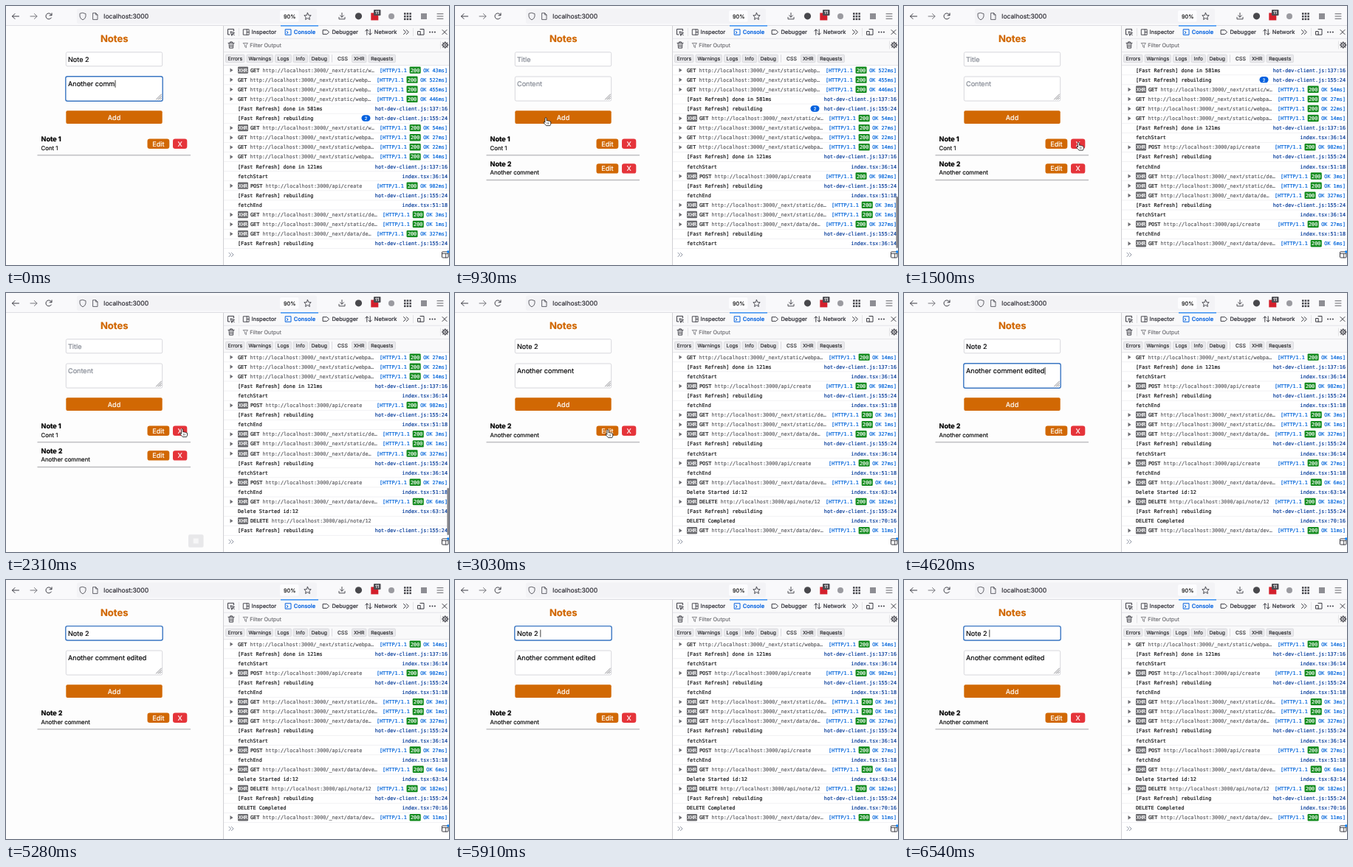
These frames come from a looping animation (600x352 px, 6.57 s). An HTML page with a canvas:

```html
<!DOCTYPE html>
<html lang="en">
<head>
<meta charset="utf-8">
<title>Notes</title>
<style>
html, body { margin: 0; width: 600px; height: 352px; overflow: hidden; background: #fdfdfd; }
canvas { display: block; width: 600px; height: 352px; }
</style>
</head>
<body>
<canvas id="stage" width="600" height="352"></canvas>
<script>
const ctx = document.getElementById('stage').getContext('2d');
const LOOP = 6570, TICK = 30;
const SANS = 'Inter, Roboto, sans-serif';
const MONO = '6.8px "DejaVu Sans Mono", monospace';
const ORANGE = '#d16803', RED = '#e5343a', BLUE = '#0060df', INK = '#3a3a42';

// ---------- drawing helpers ----------
function rect(x, y, w, h, fill) { ctx.fillStyle = fill; ctx.fillRect(x, y, w, h); }

function box(x, y, w, h, r, fill, stroke, lw = 1) {
  ctx.beginPath();
  ctx.roundRect(x, y, w, h, r);
  if (fill) { ctx.fillStyle = fill; ctx.fill(); }
  if (stroke) { ctx.strokeStyle = stroke; ctx.lineWidth = lw; ctx.stroke(); }
}

function dot(x, y, r, fill) {
  ctx.beginPath();
  ctx.arc(x, y, r, 0, 7);
  ctx.fillStyle = fill;
  ctx.fill();
}

function path(d, x, y, stroke, lw = 1, fill) {
  ctx.save();
  ctx.translate(x, y);
  const p = new Path2D(d);
  if (fill) { ctx.fillStyle = fill; ctx.fill(p); }
  if (stroke) { ctx.strokeStyle = stroke; ctx.lineWidth = lw; ctx.lineCap = ctx.lineJoin = 'round'; ctx.stroke(p); }
  ctx.restore();
}

// A hairline stroke gives small type the heavier desktop rendering.
function text(s, x, y, font, fill, align = 'left') {
  ctx.font = font;
  ctx.fillStyle = ctx.strokeStyle = fill;
  ctx.lineWidth = 0.2;
  ctx.textAlign = align;
  ctx.fillText(s, x, y);
  ctx.strokeText(s, x, y);
}

const sans = (size, weight = 400) => `${weight} ${size}px ${SANS}`;
const clamp = v => Math.max(0, Math.min(1, v));

// ---------- console log ----------
const HOST = 'http://localhost:3000/';
const net = (xhr, verb, url, ms, at = 0, done = 0) => ({ xhr, verb, url, ms, at, done });
const msg = (line, src, at = 0, count = 0) => ({ line, src, at, count });
const REBUILD = '[Fast Refresh] rebuilding', HOT = 'hot-dev-client.js:';
const LOG = [
  net(1, 'GET', '_next/static/w…', 43),
  net(0, 'GET', '_next/static/webp…', 522),
  net(0, 'GET', '_next/static/webp…', 455),
  net(0, 'GET', '_next/static/webp…', 446),
  msg('[Fast Refresh] done in 581ms', HOT + '137:16'),
  msg(REBUILD, HOT + '155:24', 0, 2),
  net(1, 'GET', '_next/static/w…', 54),
  net(0, 'GET', '_next/static/webpa…', 27),
  net(0, 'GET', '_next/static/webpa…', 22),
  net(0, 'GET', '_next/static/webpa…', 14),
  msg('[Fast Refresh] done in 121ms', HOT + '137:16'),
  msg('fetchStart', 'index.tsx:36:14'),
  net(1, 'POST', 'api/create', 982),
  msg(REBUILD, HOT + '155:24'),
  msg('fetchEnd', 'index.tsx:51:18'),
  net(1, 'GET', '_next/static/de…', 3),
  net(1, 'GET', '_next/static/de…', 1),
  net(1, 'GET', '_next/data/de…', 327),
  msg(REBUILD, HOT + '155:24'),
  msg('fetchStart', 'index.tsx:36:14', 780),
  net(1, 'POST', 'api/create', 27, 960, 1050),
  msg('fetchEnd', 'index.tsx:51:18', 1050),
  net(1, 'GET', '_next/data/deve…', 6, 1110, 1170),
  msg('Delete Started id:12', 'index.tsx:63:14', 2100),
  net(1, 'DELETE', 'api/note/12', 182, 2130, 2400),
  msg(REBUILD, HOT + '155:24', 2220),
  msg('DELETE Completed', 'index.tsx:70:16', 2400),
  net(1, 'GET', '_next/data/dev…', 11, 2460, 2550)
];

function tag(label, x, y, w, fill) {
  box(x, y - 7.3, w, 9.4, 1.2, fill);
  text(label, x + w / 2, y, MONO, '#fff', 'center');
}

function netRow(e, y, t) {
  path('M0-2.8L4 0L0 2.8Z', 303.5, y - 2.4, null, 0, '#6c6c71');
  let x = 314;
  if (e.xhr) { tag('XHR', x, y, 14, '#6a6a6e'); x += 17; }
  text(e.verb, x, y, MONO, '#18181a');
  text(HOST + e.url, x + (e.verb.length + 1) * 4.094, y, MONO, '#626267');
  if (t < e.done) return;
  const tail = `OK ${e.ms}ms]`, left = 598 - tail.length * 4.094;
  text(tail, left, y, MONO, '#0064da');
  tag('200', left - 18.6, y, 15, '#118a1c');
  text('[HTTP/1.1', left - 22.4, y, MONO, '#0064da', 'right');
}

function consoleLog(t) {
  const rows = LOG.filter(e => t >= e.at);
  ctx.save();
  ctx.beginPath();
  ctx.rect(295, 81, 305, 249.5);
  ctx.clip();
  rows.slice(-20).reverse().forEach((e, i) => {
    const y = 325.3 - i * 13.09;
    rect(295, y + 3.8, 305, 0.6, '#e8e8ec');
    if (e.verb) return netRow(e, y, t);
    text(e.line, 314, y, MONO, '#18181a');
    text(e.src, 598, y, MONO, '#0a3f9c', 'right');
    if (e.count) {
      box(481.5, y - 6.8, 12, 8.4, 4.2, BLUE);
      text(e.count, 487.5, y - 0.2, sans(6), '#fff', 'center');
    }
  });
  ctx.restore();
  scrollbar(t, 780, 1380, 259);
  scrollbar(t, 2100, 2760, 265);
}

function scrollbar(t, from, to, y) {
  if (t < from || t > to) return;
  ctx.globalAlpha = clamp((to - t) / 150);
  box(597.4, y, 2.6, 329 - y, 1.3, '#85858a');
  ctx.globalAlpha = 1;
}

// ---------- browser chrome ----------
function toolbar() {
  rect(0, 0, 600, 27, '#f9f9fb');
  rect(0, 26, 600, 0.8, '#d8d8de');
  path('M9 0H0M3.5-3.5L0 0L3.5 3.5', 8.5, 14, INK, 1);
  path('M0 0H9M5.5-3.5L9 0L5.5 3.5', 33, 14, '#77777d', 1);
  path('M4-1.4A4 4 0 1 0 3.6 2M4.2-4.2V-1.2H1.2', 57.8, 14, INK, 1);
  box(96, 3.5, 325, 20.5, 2.5, '#f3f3f6');
  path('M0-4.6L4-3.4V0Q3.6 3.4 0 4.8Q-3.6 3.4-4 0V-3.4Z', 104, 14, '#55555d', 0.9);
  path('M-3-4.4H.6L3-2V4.4H-3ZM.6-4.4V-2H3', 121, 14, '#55555d', 0.9);
  text('localhost:3000', 132.3, 17, sans(8.6), '#2c2b33');
  box(371, 6, 25.5, 15.5, 2, '#fcfcfe');
  text('90%', 384.2, 16.6, sans(7.3), '#222', 'center');
  path('M0-4.7L1.4-1.5L4.7-1.2L2.3 1L2.9 4.4L0 2.6L-2.9 4.4L-2.3 1L-4.7-1.2L-1.4-1.5Z', 408.5, 14, INK, 0.9);
  path('M0-4.4V1.3M-2.4-1L0 1.4L2.4-1M-4 1.5V4H4V1.5', 455, 13.8, INK, 0.9);
  dot(477.5, 13.8, 4.6, '#48484c');
  rect(494.3, 9.4, 10, 10, '#d3202c');
  box(498, 5, 9.5, 8, 1, '#4c4c52');
  text('11', 502.7, 11.2, sans(6), '#fff', 'center');
  dot(522, 14, 4, '#9a9aa0');
  for (let i = 0; i < 9; i++) rect(539 + i % 3 * 3.7, 9.2 + (i / 3 | 0) * 3.7, 2.5, 2.5, '#44444a');
  rect(562, 10, 8, 8, '#8d8d93');
  path('M0-3.3H8M0 0H8M0 3.3H8', 584, 14, '#55555b', 0.9);
}

const FILTERS = [
  ['Errors', 297.5, 25.5], ['Warnings', 326, 35.5], ['Logs', 364.5, 22], ['Info', 389, 19.5],
  ['Debug', 411, 26.5], ['CSS', 447, 18], ['XHR', 468.5, 19.5], ['Requests', 491, 36.5]
];

function devtools() {
  rect(295, 27, 305, 325, '#fff');
  rect(295, 27, 305, 54, '#f9f9fa');
  rect(294, 27, 0.9, 325, '#cbcbd0');
  for (const y of [43.8, 62, 80.3]) rect(295, y, 305, 0.8, '#e0e0e4');

  const tab = sans(7.5, 500);
  path('M3.5-1.5V-4H-4.5V3.5H-2M-.5-.5L4.5 1.2L2 2L1 4.6ZM2.2 2.2L4.2 4.4', 305, 35.4, INK, 1);
  rect(315, 30, 0.7, 11, '#d8d8dc');
  path('M-3.7-3.7H3.7V3.7H-3.7ZM.8-3.7V3.7M.8 0H3.7', 325.4, 35.5, INK, 0.9);
  text('Inspector', 332.4, 38.2, tab, INK);
  path('M-3.7-3.7H3.7V3.7H-3.7ZM-2-1.2L-.2.5L-2 2', 382.3, 35.5, BLUE, 1);
  text('Console', 389.7, 38.2, tab, BLUE);
  path('M-4-2.8H1.2L4.2 0L1.2 2.8H-4Z', 433.5, 35.5, INK, 1);
  text('Debugger', 441.4, 38.2, tab, INK);
  path('M-2.2 3.7V-3.5M-4.2-1.5L-2.2-3.6L-.2-1.5M2.2-3.7V3.5M.2 1.5L2.2 3.6L4.2 1.5', 491, 35.5, INK, 1);
  text('Network', 498.8, 38.2, tab, INK);
  path('M-3-3L0 0L-3 3M.8-3L3.8 0L.8 3', 541.5, 35.5, INK, 1);
  rect(551, 30, 0.7, 11, '#d8d8dc');
  path('M-1-4H4V3.6H-1M-4-1H-.8V3.6H-4Z', 562, 35.5, INK, 1);
  for (let i = -1; i < 2; i++) dot(577.5 + i * 3.4, 35.5, 1, INK);
  path('M-3-3L3 3M3-3L-3 3', 594, 35.5, INK, 1);

  path('M-4-2.7H4M-1.4-2.8V-4.2H1.4V-2.8M-3-2.6L-2.5 4.2H2.5L3-2.6M-1-.8V2.6M1-.8V2.6', 305, 53, INK, 0.9);
  rect(315, 47.5, 0.7, 11, '#d8d8dc');
  path('M-3-3H3L.9 0V3.2L-.9 2V0Z', 324.5, 53.4, '#7c7c82', 0.9);
  text('Filter Output', 330.2, 56.1, sans(7.3), '#76767b');
  rect(588, 47.5, 0.7, 11, '#d8d8dc');
  for (let i = 0; i < 8; i++) {
    const a = i * Math.PI / 4;
    path(`M${3 * Math.cos(a)} ${3 * Math.sin(a)}L${4 * Math.cos(a)} ${4 * Math.sin(a)}`, 594.8, 53, INK, 1.4);
  }
  path('M3 0A3 3 0 1 1-3 0A3 3 0 1 1 3 0M1 0A1 1 0 1 1-1 0A1 1 0 1 1 1 0', 594.8, 53, INK, 1);

  for (const [label, x, w] of FILTERS) {
    if (label !== 'CSS') box(x, 66.1, w, 10.6, 1.5, '#e9e9ec', '#cfcfd4', 0.6);
    text(label, x + w / 2, 73.9, sans(6.9), '#2a2a2e', 'center');
  }
  rect(441, 66.1, 0.7, 10.5, '#cfcfd3');

  path('M-3-2.6L-.4 0L-3 2.6M.4-2.6L3 0L.4 2.6', 305, 338, '#7f8697', 0.9);
  box(590.5, 334, 8.5, 8, 1, null, INK, 1);
  path('M-4-1.4H4M1-1.4V4', 594.7, 338, INK, 0.9);
  dot(598.8, 334, 1.7, '#0a84ff');
}

// ---------- notes page ----------
const BODY = sans(9.1);

function typed(base, extra, start, step, t) {
  return base + extra.slice(0, Math.max(0, Math.floor((t - start) / step) + 1));
}

function formState(t) {
  if (t < 780) return {
    title: 'Note 2', content: typed('Another comm', 'ent', 90, 90, t),
    focus: t < 720 ? 'content' : '', caret: t < 540
  };
  if (t < 2970) return { title: '', content: '', focus: '', caret: false };
  const inTitle = t >= 4860, inContent = t >= 3420 && !inTitle;
  return {
    title: t >= 5130 ? 'Note 2 ' : 'Note 2',
    content: typed('Another comment', ' edited', 3780, 120, t),
    focus: inTitle ? 'title' : inContent ? 'content' : '',
    caret: t < 5130 || (t - 5280) % 720 >= 360
  };
}

function field(value, hint, y, h, base, active, caret) {
  if (active) box(80.8, y - 0.2, 131.4, h + 0.4, 2.5, '#fff', '#3a76c2', 1.4);
  else box(81.3, y, 130.4, h, 1.8, '#fff', '#d3d3d8', 0.9);
  text(value || hint, 84, base, BODY, value ? '#0c0c0e' : '#868b95');
  if (active && caret) rect(84.3 + ctx.measureText(value).width, base - 8, 0.8, 10, '#111');
}

function button(label, x, y, w, h, r, fill, base) {
  box(x, y, w, h, r, fill);
  text(label, x + w / 2, base, BODY, '#fff', 'center');
}

function note(title, body, i) {
  const y = i * 33.6;
  text(title, 47.5, y + 184, sans(9.1, 700), '#000');
  text(body, 47.5, y + 195.6, sans(7.85), '#111');
  button('Edit', 191.5, y + 180.6, 29.8, 13.4, 3.2, ORANGE, y + 190.5);
  button('X', 226, y + 180.6, 19.3, 13.4, 3.2, RED, y + 190.5);
  rect(42.5, y + 202.2, 207.5, 1.1, '#adadb1');
  rect(42.5, y + 203.3, 207.5, 0.8, '#e4e4e7');
}

function page(t) {
  text('Notes', 146.7, 49.3, sans(13, 700), ORANGE, 'center');
  const f = formState(t);
  field(f.title, 'Title', 62.8, 19, 75.6, f.focus === 'title', f.caret);
  field(f.content, 'Content', 96, 33, 108.8, f.focus === 'content', f.caret);
  path('M0 7L7 0M2.6 7L7 2.6M5 7L7 5', 203.5, 120, '#6a6a70', 0.8);
  button('Add', 81.3, 142.3, 130.4, 17.6, 2, ORANGE, 154.6);

  const notes = [];
  if (t < 2460) notes.push(['Note 1', 'Cont 1']);
  if (t >= 780) notes.push(['Note 2', 'Another comment']);
  notes.forEach(([a, b], i) => note(a, b, i));

  // build indicator
  const glow = clamp((t - 2220) / 60) * clamp((2520 - t) / 90);
  if (glow) {
    ctx.globalAlpha = glow;
    box(247, 328.3, 20.5, 17.5, 2, '#e8e8ea');
    rect(253.7, 333.5, 7, 7, '#f6f6f7');
    ctx.globalAlpha = 1;
  }
}

// ---------- pointer ----------
const MOVES = [
  [[390, 160, 114], [660, 123, 152], [1320, 123, 152], [1470, 236.5, 185.5], [2310, 238.7, 185],
   [2640, 238.7, 185], [2850, 207, 186], [3060, 207, 186], [3390, 172, 106], [3720, 172, 106]],
  [[4680, 172, 106], [4830, 128, 73], [5130, 128, 73]]
];

function pointer(t) {
  const keys = MOVES.find(k => t >= k[0][0] && t < k[k.length - 1][0]);
  if (!keys) return;
  const i = keys.findIndex(k => t < k[0]);
  const [t0, x0, y0] = keys[i - 1], [t1, x1, y1] = keys[i];
  const p = (t - t0) / (t1 - t0), e = p * p * (3 - 2 * p);
  const x = x0 + (x1 - x0) * e, y = y0 + (y1 - y0) * e;
  const inside = (l, top, r, b) => x > l && x < r && y > top && y < b;
  if (inside(81, 62, 212, 82) || inside(81, 95, 212, 129)) {
    path('M-2-5Q0-5 0-3.6V3.6Q0 5-2 5M2-5Q0-5 0-3.6M0 3.6Q0 5 2 5', x, y, '#222', 0.9);
  } else if (inside(81, 142, 212, 160) || inside(191, 180, 221, 194) || inside(226, 180, 245, 194)) {
    path('M-1.1 6V.8Q-1.1-.3 0-.3Q1.1-.3 1.1.8V4Q2.6 3.2 3.2 4.3Q4.7 3.7 5.2 4.8Q6.8 4.6 6.8 6V8Q6.6 9.4 5.8 10.6H.6Q-1 8.8-2.8 6.8Q-3.3 5.4-2 5.4Z',
      x, y, '#111', 0.8, '#fff');
    path('M1.8 6.4V8.4M3.5 6.4V8.4', x, y, '#111', 0.5);
  } else {
    path('M0 0V9.4L2.2 7.4L3.7 10.7L5.2 10L3.7 6.8H6.7Z', x, y, '#fff', 0.7, '#111');
  }
}

// ---------- loop ----------
function draw(now) {
  const t = Math.floor(now % LOOP / TICK) * TICK;
  ctx.textRendering = 'geometricPrecision';
  ctx.lineJoin = 'round';
  rect(0, 0, 600, 352, '#fdfdfd');
  page(t);
  devtools();
  consoleLog(t);
  toolbar();
  rect(372, 26.2, 51, 1.4, '#2f8df5');
  pointer(t);
}

let start = null;
function frame(now) {
  if (start === null) start = now;
  draw(now - start);
  requestAnimationFrame(frame);
}
draw(0);
requestAnimationFrame(frame);
</script>
</body>
</html>
```
